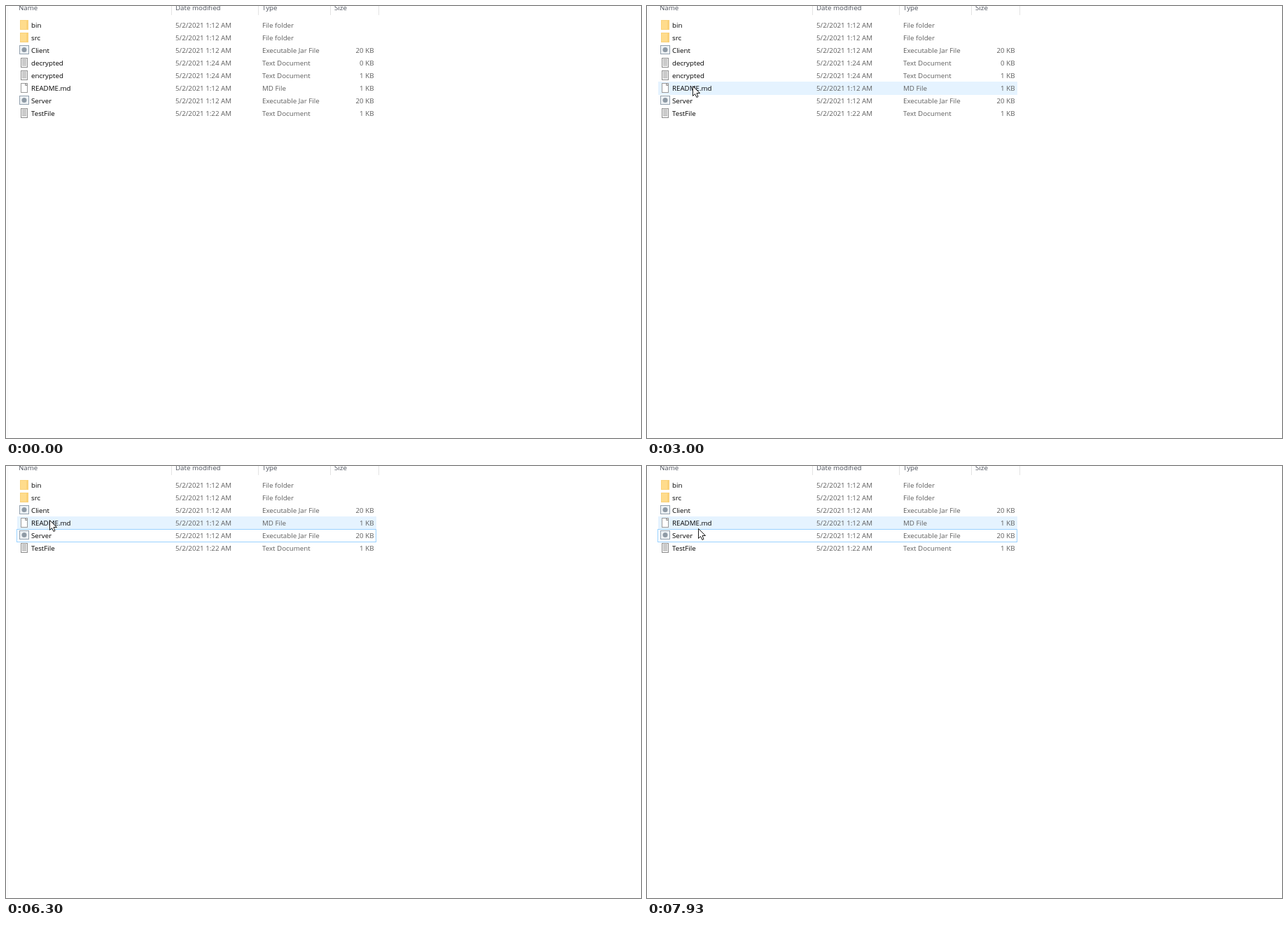
Animation of 907x617 px, one loop 8 s. Source, as an HTML page with a canvas:

```html
<!DOCTYPE html>
<html lang="en">
<head>
<meta charset="utf-8">
<title>File list</title>
<style>
html, body { margin: 0; width: 100%; height: 100%; overflow: hidden; background: #fff; }
canvas { display: block; }
</style>
</head>
<body>
<canvas id="stage" width="907" height="617"></canvas>
<script>
const ctx = document.getElementById('stage').getContext('2d');
const LOOP = 8000, STEP = 70, ROW = 18, TOP = 18;
const GRAY = '#5e5e5e';

const COLS = { 'Name': 18, 'Date modified': 242, 'Type': 366, 'Size': 469 };
const KINDS = { dir: 'File folder', jar: 'Executable Jar File', txt: 'Text Document', md: 'MD File' };
const FILES = [
  ['bin', 'dir', '1:12', ''],
  ['src', 'dir', '1:12', ''],
  ['Client', 'jar', '1:12', '20 KB'],
  ['decrypted', 'txt', '1:24', '0 KB'],
  ['encrypted', 'txt', '1:24', '1 KB'],
  ['README.md', 'md', '1:12', '1 KB'],
  ['Server', 'jar', '1:12', '20 KB'],
  ['TestFile', 'txt', '1:22', '1 KB']
];

// The pointer enters at ENTRY, then glides to each stop and rests there
const ENTRY = { x: 761, y: 555 };
const GLIDES = [
  { from: 400, to: 1580, x: 59, y: 164, power: 2.3 },
  { from: 1580, to: 1710, x: 65, y: 156 },
  { from: 2650, to: 3420, x: 65, y: 82, power: 1.4 },
  { from: 4880, to: 5020, x: 62, y: 77 },
  { from: 6560, to: 6910, x: 66, y: 96 },
  { from: 6910, to: 7110, x: 80, y: 167 },
  { from: 7110, to: 7390, x: 76, y: 45 },
  { from: 7390, to: 7660, x: 77, y: 130 },
  { from: 7660, to: 7930, x: 73, y: 89 }
];

const easeOut = (p, power = 1) => 1 - (1 - p) ** power;

function pointer(t) {
  if (t < GLIDES[0].from) return null;
  let { x, y } = ENTRY;
  for (const g of GLIDES) {
    if (t < g.from) break;
    // 15 ms of slack keeps uneven screen refreshes on the step grid
    const held = STEP * Math.floor((t - g.from + 15) / STEP);
    const k = easeOut(Math.min(1, held / (g.to - g.from)), g.power);
    x += (g.x - x) * k;
    y += (g.y - y) * k;
  }
  return { x: Math.round(x), y: Math.round(y) };
}

function box(x, y, w, h, fill, line) {
  ctx.fillStyle = fill;
  ctx.fillRect(x, y, w, h);
  if (!line) return;
  ctx.strokeStyle = line;
  ctx.lineWidth = 1;
  ctx.strokeRect(x + .5, y + .5, w - 1, h - 1);
}

function text(s, x, y, color, align = 'left') {
  ctx.font = '9.75px "Open Sans", "Noto Sans", sans-serif';
  ctx.textAlign = align;
  ctx.fillStyle = color;
  ctx.fillText(s, x, y);
}

function poly(points, fill, line) {
  ctx.beginPath();
  points.forEach(([x, y]) => ctx.lineTo(x, y));
  ctx.closePath();
  ctx.fillStyle = fill;
  ctx.fill();
  ctx.strokeStyle = line;
  ctx.lineWidth = 1;
  ctx.stroke();
}

function disc(x, y, r, color) {
  ctx.fillStyle = color;
  ctx.beginPath();
  ctx.arc(x, y, r, 0, Math.PI * 2);
  ctx.fill();
}

const ICONS = {
  dir(y) {
    box(20, y + 2, 12, 14, '#fad27b');
    box(21, y + 3, 8, 12, '#ffdc8c');
  },
  jar(y) {
    box(19, y + 2, 14, 13, '#eef2f5', '#93a1ae');
    disc(26, y + 8.5, 3.5, '#8f9ba6');
  },
  txt(y) {
    box(21, y + 2, 10, 14, '#f3f3f3', '#8e8e8e');
    for (let i = 0; i < 5; i++) box(23, y + 4 + i * 2, 6, 1, '#a2a2a2');
  },
  md(y) {
    box(21, y + 2, 10, 14, '#fff', '#9a9a9a');
    poly([[27.5, y + 2.5], [27.5, y + 5.5], [30.5, y + 5.5]], '#fff', '#9a9a9a');
  }
};

function header() {
  for (const name in COLS) text(name, COLS[name], 6, '#4f545e');
  [236, 360, 463, 532].forEach(x => box(x, 0, 1, 13, '#e3e3e3'));
  box(2, 0, 1, 615, '#f7f7f7');
}

function row([name, kind, time, size], i, { hover, picked, focus }) {
  const y = TOP + i * ROW, base = y + 13;
  if (picked) box(15, y, 514, ROW + 1, '#cce8ff', '#99d1ff');
  else if (hover) box(16, y, 513, ROW + 1, focus ? '#d7e8f8' : '#e5f3ff');
  else if (focus) box(15, y, 514, ROW + 1, '#fff', '#99d1ff');
  ICONS[kind](y);
  text(name, 36, base, '#000');
  text(`5/2/2021 ${time} AM`, COLS['Date modified'], base, GRAY);
  text(KINDS[kind], COLS.Type, base, GRAY);
  text(size, 525.5, base, GRAY, 'right');
}

function arrow({ x, y }) {
  const shape = [[0, 0], [0, 14], [3, 11], [5.5, 16], [7.5, 15], [5.5, 10], [10, 10]];
  poly(shape.map(([a, b]) => [x + a + .5, y + b + .5]), '#fff', '#1a1a1a');
}

function draw(t) {
  box(0, 0, 907, 617, '#fff');
  header();
  const at = pointer(t), removed = t >= 6300;
  const files = removed ? FILES.filter(f => !f[0].endsWith('crypted')) : FILES;
  const over = at && at.x < 529 ? Math.floor((at.y - TOP) / ROW) : -1;
  files.forEach((f, i) => row(f, i, {
    hover: i === over,
    picked: f[0] === 'decrypted' && t >= 4350 || f[0] === 'encrypted' && t >= 5500,
    focus: removed && f[0] === 'Server'
  }));
  if (t >= 4280 && t < 4420) disc(65.5, 81.5, 10, 'rgba(248,240,30,.72)');
  if (at) arrow(at);
}

const start = performance.now();
function tick() {
  draw((performance.now() - start) % LOOP);
  requestAnimationFrame(tick);
}
tick();
</script>
</body>
</html>
```
